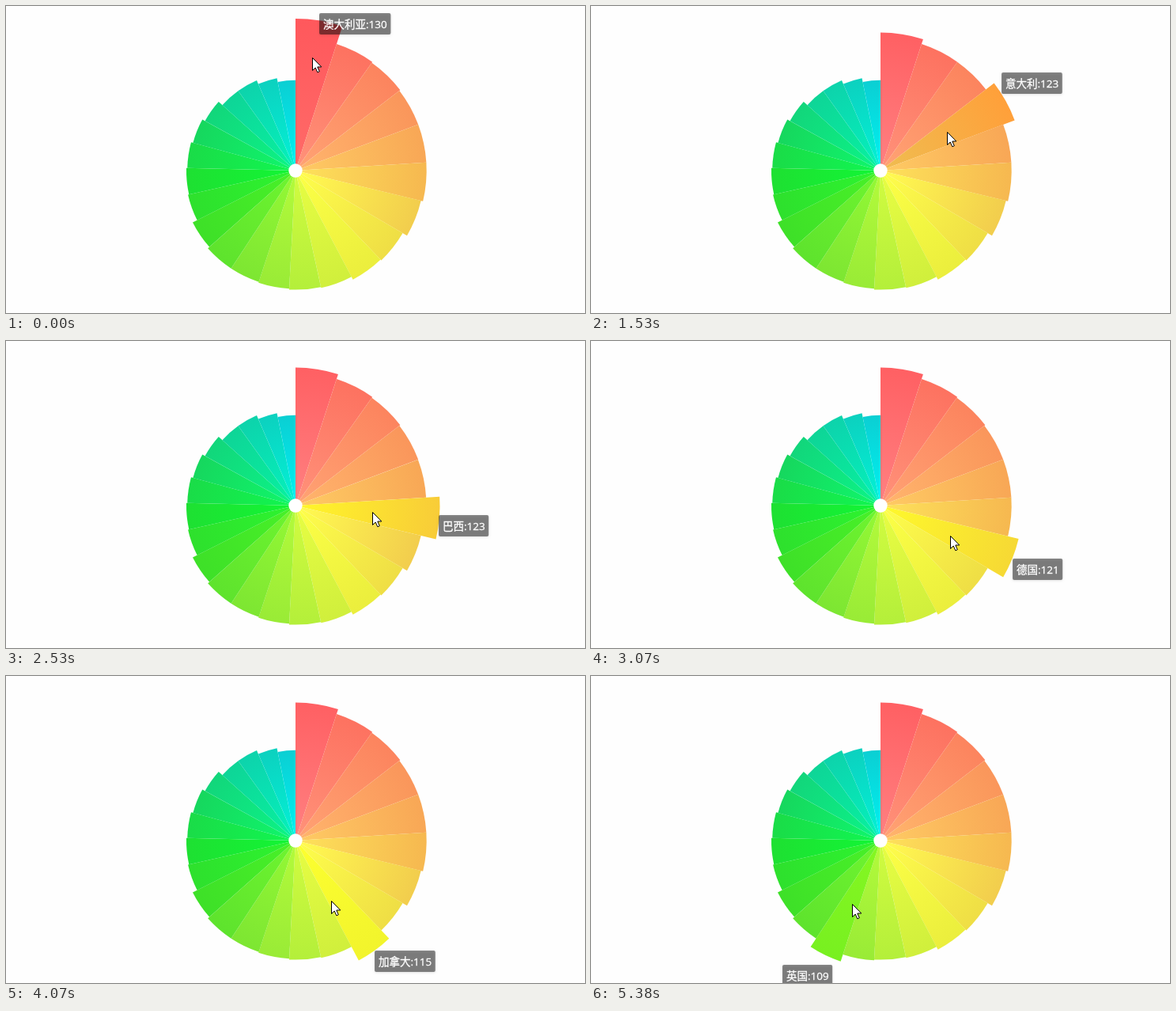
Write an HTML page with a canvas that moves like this. It is 732x388 px and loops after 5460 ms.

```html
<!DOCTYPE html>
<html lang="zh">
<head>
<meta charset="utf-8">
<style>
html, body { margin: 0; width: 100%; height: 100%; overflow: hidden; background: #fefefe; }
canvas { display: block; }
</style>
</head>
<body>
<canvas id="stage" width="732" height="388"></canvas>
<script>
const ctx = document.getElementById('stage').getContext('2d');
const LOOP = 5460, STEP = LOOP / 71;
const CX = 366, CY = 208, HOLE = 8.7, MIN_RADIUS = 11, MAX_RADIUS = 174.5, TIP_HEIGHT = 27;

const values = [130, 125, 124, 123, 123, 123, 121, 116, 115, 112, 111, 110,
  109, 109, 107, 102, 101, 100, 98, 95, 90, 90, 86, 82];
const names = ['澳大利亚', '瑞士', '挪威', '意大利', '新西兰', '巴西', '德国',
  '西班牙', '加拿大', '法国', '韩国', '斯洛伐克', '英国'];
// Moment at which the pointer enters each named slice
const enters = [-1000, 411, 1010, 1420, 1815, 2350, 2775, 3253, 3762, 4150, 4505, 4872, 5355];

// Colour stops: slice index, rim colour, core colour
const calm = [
  [0, 0xff6063, 0xff7f80], [3, 0xfa965b, 0xffb46c], [5, 0xf6b850, 0xfde05a],
  [6, 0xf2cd4d, 0xfffa50], [8, 0xebee3d, 0xfbff46], [10, 0xb4ef3a, 0xd0fb40],
  [12, 0x7de632, 0x94f835], [14, 0x3ee028, 0x48f028], [16, 0x1ee032, 0x12f535],
  [18, 0x16d75e, 0x10f56a], [20, 0x0ed597, 0x08f0a0], [23, 0x0bcfd3, 0x00f0f0]
];
const vivid = [
  [0, 0xff585c, 0xff6a68], [1, 0xff7050, 0xff8060], [3, 0xffa03a, 0xf0bc50],
  [5, 0xf8cc38, 0xfff52a], [8, 0xf2f42c, 0xfcff30], [12, 0x78f020, 0x84f722]
];
// Pointer path in polar form: time, angle in degrees, distance
const path = [[0, 8.35, 144.5], [840, 28, 125.7], [1530, 59.7, 97.2], [2530, 94.7, 97.3],
  [3070, 113.4, 95.9], [4070, 149.4, 88.3], [5380, 204.2, 87.7]];

const mix = (a, b, k) => a + (b - a) * k;
const clamp = k => Math.max(0, Math.min(1, k));
const rad = deg => deg * Math.PI / 180;
const channels = c => [c >> 16, c >> 8 & 255, c & 255];
const point = (angle, r) => [CX + r * Math.sin(angle), CY - r * Math.cos(angle)];
const outQuint = k => 1 - (1 - clamp(k)) ** 5;
const outElastic = k => k <= 0 ? 0 : k >= 1 ? 1
  : 1 + 2 ** (-10 * k) * Math.sin((k - 0.1) * 5 * Math.PI);

// Finds the neighbouring rows around x and the fraction between them
function locate(rows, x) {
  let i = 0;
  while (i < rows.length - 2 && x >= rows[i + 1][0]) i++;
  return [rows[i], rows[i + 1], clamp((x - rows[i][0]) / (rows[i + 1][0] - rows[i][0]))];
}

function shade(palette, index, column) {
  const [a, b, k] = locate(palette, index);
  const to = channels(b[column]);
  return 'rgb(' + channels(a[column]).map((c, i) => Math.round(mix(c, to[i], k))) + ')';
}

const total = values.reduce((a, b) => a + b);
let sum = 0;
const slices = values.map((value, i) => {
  const start = sum / total * 2 * Math.PI;
  sum += value;
  const end = sum / total * 2 * Math.PI;
  const r = mix(MIN_RADIUS, MAX_RADIUS, value / values[0]);
  const slice = { start, end, r };
  if (names[i]) {
    const [x, y] = point((start + end) / 2, r * 1.1);
    slice.width = 36 + 13.6 * names[i].length;
    slice.tip = [x < CX ? x - slice.width : x, Math.max(9, y < CY ? y - TIP_HEIGHT : y)];
  }
  return slice;
});

function drawSlice(i, t, active) {
  const { start, end, r } = slices[i];
  const grow = outElastic((t - enters[i]) / 300 || 0) - outElastic((t - enters[i + 1]) / 300 || 0);
  const size = r * (1 + 0.1 * grow);
  const palette = i === active ? vivid : calm;
  const fill = ctx.createRadialGradient(CX, CY, HOLE, CX, CY, size);
  fill.addColorStop(0, shade(palette, i, 2));
  fill.addColorStop(1, shade(palette, i, 1));
  ctx.beginPath();
  ctx.moveTo(CX, CY);
  ctx.arc(CX, CY, size, start - Math.PI / 2, end - Math.PI / 2);
  ctx.closePath();
  ctx.fillStyle = fill;
  ctx.fill();
}

function drawTip(i, t) {
  const { tip, width } = slices[i];
  const from = i ? slices[i - 1].tip : tip;
  const k = outQuint((t - enters[i]) / 400);
  const x = Math.round(mix(from[0], tip[0], k)), y = Math.round(mix(from[1], tip[1], k));
  const label = names[i] + ':' + values[i];
  ctx.save();
  ctx.shadowColor = 'rgba(0,0,0,.25)';
  ctx.shadowBlur = 3;
  ctx.shadowOffsetY = 1;
  ctx.fillStyle = 'rgba(0,0,0,.46)';
  ctx.beginPath();
  ctx.roundRect(x, y, width, TIP_HEIGHT, 2);
  ctx.fill();
  ctx.restore();
  ctx.font = '13.5px "Open Sans", "Noto Sans CJK SC", "Noto Sans CJK", sans-serif';
  ctx.fillStyle = ctx.strokeStyle = '#fff';
  ctx.lineWidth = 0.3;
  ctx.fillText(label, x + 5, y + 18.5);
  ctx.strokeText(label, x + 5, y + 18.5);
}

function drawPointer(t) {
  const [a, b, k] = locate(path, t);
  const [x, y] = point(rad(mix(a[1], b[1], k)), mix(a[2], b[2], k));
  ctx.save();
  ctx.translate(Math.round(x) + 0.5, Math.round(y) + 0.5);
  const arrow = new Path2D('M0 0V16L3.7 12.5L6.3 18.3L8.8 17.2L6.3 11.5H11.3Z');
  ctx.fillStyle = '#fff';
  ctx.fill(arrow);
  ctx.strokeStyle = '#000';
  ctx.lineWidth = 1;
  ctx.stroke(arrow);
  ctx.restore();
}

function draw(now) {
  const tick = Math.min(70, Math.floor((now % LOOP + 9.9) / STEP));
  const t = Math.floor(tick * STEP / 10) * 10;
  const active = enters.filter(e => e <= t).length - 1;
  ctx.fillStyle = '#fefefe';
  ctx.fillRect(0, 0, 732, 388);
  slices.forEach((_, i) => drawSlice(i, t, active));
  ctx.fillStyle = '#fff';
  ctx.beginPath();
  ctx.arc(CX, CY, HOLE, 0, 2 * Math.PI);
  ctx.fill();
  drawTip(active, t);
  drawPointer(t);
}

const began = performance.now();
function loop() {
  draw(performance.now() - began);
  requestAnimationFrame(loop);
}
loop();
</script>
</body>
</html>
```
